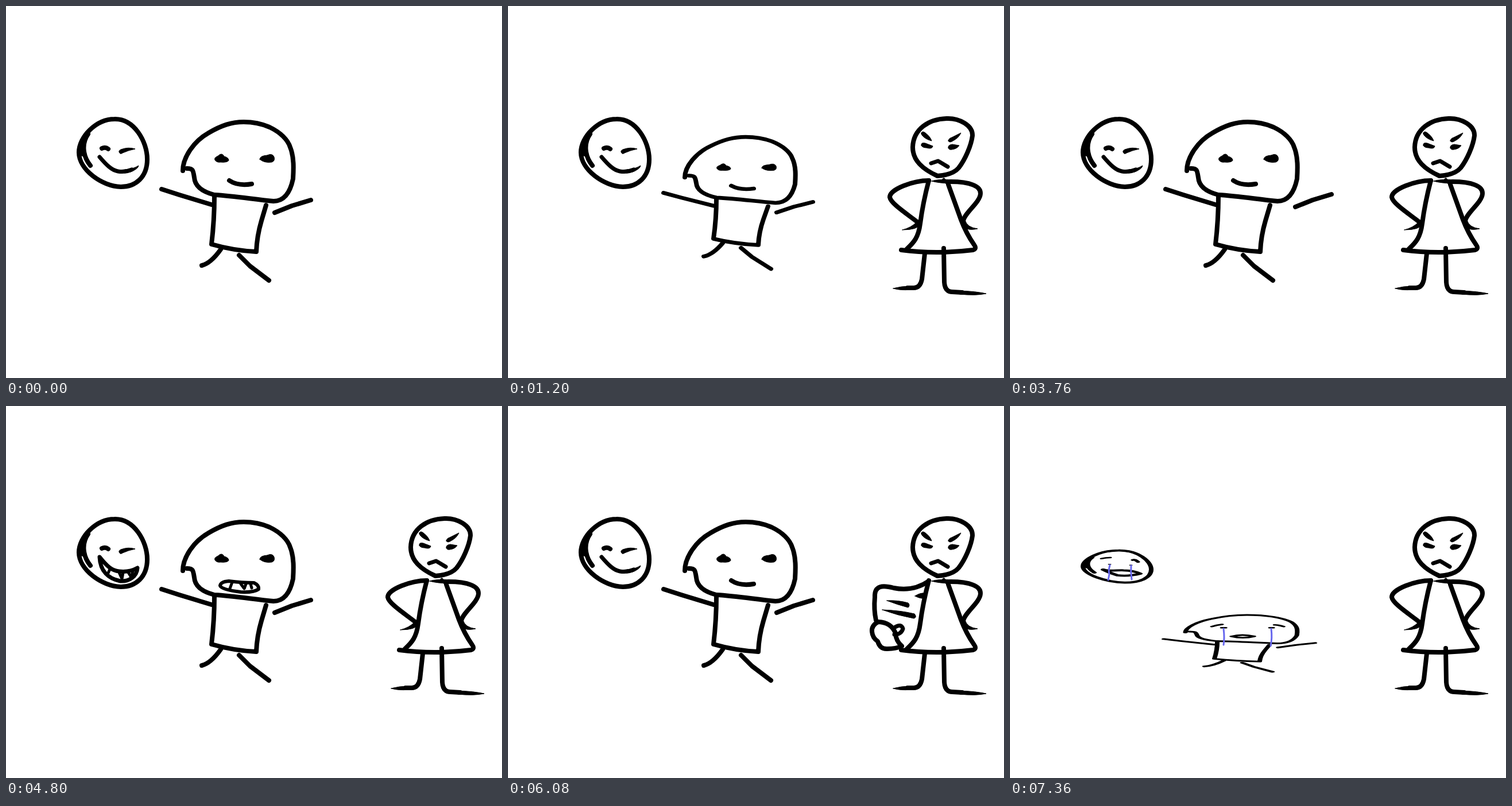
An HTML page that plays this animation: 864 by 648 pixels, repeating every 7.76 s.

```html
<!DOCTYPE html>
<html lang="en">
<head>
<meta charset="utf-8">
<title>Stick figures</title>
<style>
html, body { margin: 0; width: 100%; height: 100%; overflow: hidden; background: #fff; }
svg { display: block; width: 100vw; height: 100vh; }
path { fill: none; stroke: #000; stroke-width: 8; stroke-linecap: round; stroke-linejoin: round; }
.mid { stroke-width: 7; }
.thin { stroke-width: 5; }
.ink { fill: #000; stroke-width: 1; }
.dress { fill: #fff; stroke: none; }
.tear { stroke: #6868ee; stroke-width: 3; }
</style>
</head>
<body>
<svg viewBox="0 0 864 648">
  <g id="balloon">
    <path d="M189 197C223 196 246 236 246 267C246 298 226 315 200 315C167 314 127 285 127 255C127 228 157 197 189 197Z"/>
    <path d="M143 223C131 240 134 262 147 278"/>
    <path class="ink" d="M145 218C132 230 126 243 128 260L136 262C134 246 139 229 145 218Z"/>
    <g id="balloonEyes">
      <path d="M167 248Q173 245 178 249"/>
      <path class="ink" d="M199 257Q194 253 200 250Q213 245 225 249Q214 251 203 256Q201 258 199 257Z"/>
    </g>
    <g id="balloonSmile">
      <path class="mid" d="M163 263C175 277 184 286 195 288Q207 290 219 285"/>
      <path class="ink" d="M207 285Q222 284 231 278Q230 284 217 289L207 291Z"/>
    </g>
    <g id="balloonLaugh">
      <path class="mid" d="M163 263C175 278 184 287 197 288Q215 290 229 282C228 298 213 306 199 305C179 301 164 288 163 263Z"/>
      <path class="thin" d="M181 284L178 291M197 290L202 301L204 290M213 290L218 298L221 288"/>
    </g>
    <g id="balloonSad">
      <path class="thin" d="M159 227Q167 223 175 223"/>
      <path class="mid" d="M214 232Q218 229 223 239"/>
      <path d="M162 267C172 274 186 269 198 270Q216 271 227 282Q206 293 187 288Q172 278 162 267Z"/>
      <path class="thin" d="M172 248h3M209 251h3" style="stroke-width:3"/>
    </g>
  </g>

  <g id="boy">
    <path d="M308 287C308 263 328 235 353 221C375 208 393 202 414 202C430 202 443 204 459 211C478 220 491 233 495 246C502 263 501 284 500 301C495 325 485 340 466 340C432 337 400 331 363 329C340 323 329 313 328 299C326 286 326 283 315 283"/>
    <path d="M363 331Q363 373 358 415Q396 426 436 428Q437 401 445 374L453 347"/>
    <path d="M271 319L302 329L358 346"/>
    <path id="arm" d="M468 360L498 348L531 338"/>
    <path d="M374 424Q357 448 341 452M406 434L425 453L458 478"/>
    <g id="boyEyes">
      <path class="ink" d="M364 268C362 263 368 263 372 259Q377 256 380 262Q388 264 388 269Q385 273 374 272Q366 273 364 268Z"/>
      <path class="ink" d="M442 267Q442 261 455 260Q464 256 467 263Q469 270 463 272Q450 274 442 267Z"/>
    </g>
    <path id="boySmile" d="M389 304Q404 314 428 310"/>
    <g id="boyLaugh">
      <path d="M373 313Q374 306 388 305Q411 308 432 308Q441 312 440 319Q432 325 409 324Q375 320 373 313Z" style="stroke-width:6"/>
      <path class="thin" d="M394 307L390 318M409 310L415 318L418 310M426 310L428 317"/>
    </g>
    <g id="boySad">
      <path class="mid" d="M354 258Q362 251 371 248M462 250Q468 250 477 258"/>
      <path class="mid" d="M371 264h6M454 264h5"/>
      <path d="M388 306Q406 293 426 306Q407 319 388 306Z"/>
    </g>
  </g>

  <g id="woman">
    <g id="paper">
      <path d="M733 305C714 318 692 321 672 317C653 312 638 312 639 333Q637 355 641 373"/>
      <path class="ink" d="M709 331Q718 325 727 326L726 335Q718 336 709 331Z"/>
      <path class="ink" d="M660 339Q679 338 697 343Q701 347 697 351Q678 346 660 339Z"/>
      <path class="ink" d="M652 355Q683 356 708 362Q713 368 707 370Q679 365 652 355Z"/>
      <path d="M645 376Q633 382 634 393Q635 404 644 410Q648 424 661 423Q676 423 686 418Q676 410 675 396Q668 377 645 376Z"/>
      <path class="mid" d="M673 386Q685 378 688 388Q685 398 673 398"/>
    </g>
    <path class="dress" d="M731 305L722 345L714 395L694 425L740 430L813 424L794 385L764 304Z"/>
    <g id="hip">
      <path d="M733 304C706 304 665 319 665 333C667 344 692 360 714 377"/>
      <path class="ink" d="M687 390Q703 386 712 376L718 380Q714 390 687 390Z"/>
    </g>
    <path d="M764 196C786 195 810 208 809 226C807 243 796 268 785 282Q775 294 748 296C722 284 705 269 705 246C706 214 733 197 764 196Z"/>
    <g id="brows">
      <path class="ink" d="M720 221Q722 217 727 221Q736 228 738 235Q727 232 722 226Q719 223 720 221Z"/>
      <path class="ink" d="M767 235Q767 231 773 229L789 221Q785 230 775 235Q769 239 767 235Z"/>
    </g>
    <path class="ink" d="M720 243Q719 237 727 239L740 244Q739 250 729 247Q722 247 720 243Z"/>
    <path class="ink" d="M767 247Q766 242 774 241L786 243Q782 249 773 250Q768 251 767 247Z"/>
    <path class="mid" d="M737 274L749 270M751 271L766 280"/>
    <path d="M733 304C724 338 721 356 718 379C715 403 707 412 695 423M685 425Q746 433 810 425Q817 423 812 416Q798 396 789 372L767 311"/>
    <path class="thin" d="M767 311L759 302"/>
    <path class="ink" d="M738 305Q750 301 773 303V309Q752 309 738 305Z"/>
    <path d="M771 306C805 306 824 314 823 327C822 343 794 361 793 375"/>
    <path class="ink" d="M791 374L796 373Q800 386 818 388Q792 394 791 374Z"/>
    <path d="M726 431L721 476Q718 491 707 491L696 491M759 422L760 481Q761 498 774 498L791 499"/>
    <path class="ink" d="M671 492Q685 488 701 488V494Q685 496 671 492Z"/>
    <path class="ink" d="M787 496Q815 497 833 501Q814 505 787 502Z"/>
  </g>

  <g id="tears">
    <path class="tear" pathLength="1" d="M174 277Q171 288 173 293L171 303"/>
    <path class="tear" pathLength="1" d="M211 278Q210 290 212 302"/>
    <path class="tear" pathLength="1" d="M372 388Q374 404 372 416"/>
    <path class="tear" pathLength="1" d="M455 388Q457 404 454 418"/>
  </g>
</svg>
<script>
const LOOP = 7760, STEP = 80;
const el = id => document.getElementById(id);
const show = (on, ...ids) => ids.forEach(id => el(id).style.display = on ? '' : 'none');
const move = (id, x, y) => el(id).setAttribute('transform', `translate(${x} ${y})`);
const clamp = v => Math.max(0, Math.min(1, v));
const between = (n, a, b) => n >= a && n <= b;
// true on every second step, starting with the first one
const flip = (n, a, b) => between(n, a, b) && (n - a) % 2 === 0;

// squash about a fixed height, with an optional sideways stretch
function pose(id, sy, base, dx, dy, sx = 1, ox = 0) {
  el(id).setAttribute('transform', `matrix(${sx} 0 0 ${sy} ${ox + dx} ${base * (1 - sy) + dy})`);
}

function paperOffset(n) {
  if (n < 72) return [71 - 22 * (n - 68), 0];
  if (n < 76) return [5, 0];
  if (n < 80) return [0, -98 * (n - 76)];
  if (n < 81) return [0, -294];
  return [0, -77 * (85 - n)];
}

function draw(time) {
  const n = Math.floor(time % LOOP / STEP);
  const down = flip(n, 2, 6) || flip(n, 59, 67);
  const dx = down ? 3.5 : 0, dy = down ? 24.5 : 0;
  const flat = clamp((n - 80) / 6);

  pose('balloon', 1 - 0.525 * flat, 301, dx, dy);
  if (flip(n, 15, 21)) pose('boy', 0.833, 358, 0, 0);
  else pose('boy', 1 - 0.6413 * flat, 454.6, dx, dy, 1 + 0.0115 * flat, -6.1 * flat);

  const poke = flip(n, 47, 55);
  move('arm', poke ? 29 : 0, poke ? -10 : 0);
  move('brows', 0, flip(n, 48, 54) ? 4 : 0);

  const laugh = between(n, 58, 67), sad = n >= 78;
  show(laugh, 'balloonLaugh', 'boyLaugh');
  show(sad, 'balloonSad', 'boySad');
  show(!sad, 'balloonEyes', 'boyEyes');
  show(!laugh && !sad, 'balloonSmile', 'boySmile');

  const paper = between(n, 68, 85);
  show(n > 0, 'woman');
  show(paper, 'paper');
  show(!paper, 'hip');
  if (paper) move('paper', ...paperOffset(n));

  const cry = clamp((n - 88) / 4);
  show(cry > 0, 'tears');
  for (const tear of el('tears').children) tear.style.strokeDasharray = `${cry} 2`;
}

let start;
function tick(now) {
  start ??= now;
  draw(now - start);
  requestAnimationFrame(tick);
}
draw(0);
requestAnimationFrame(tick);
</script>
</body>
</html>
```
